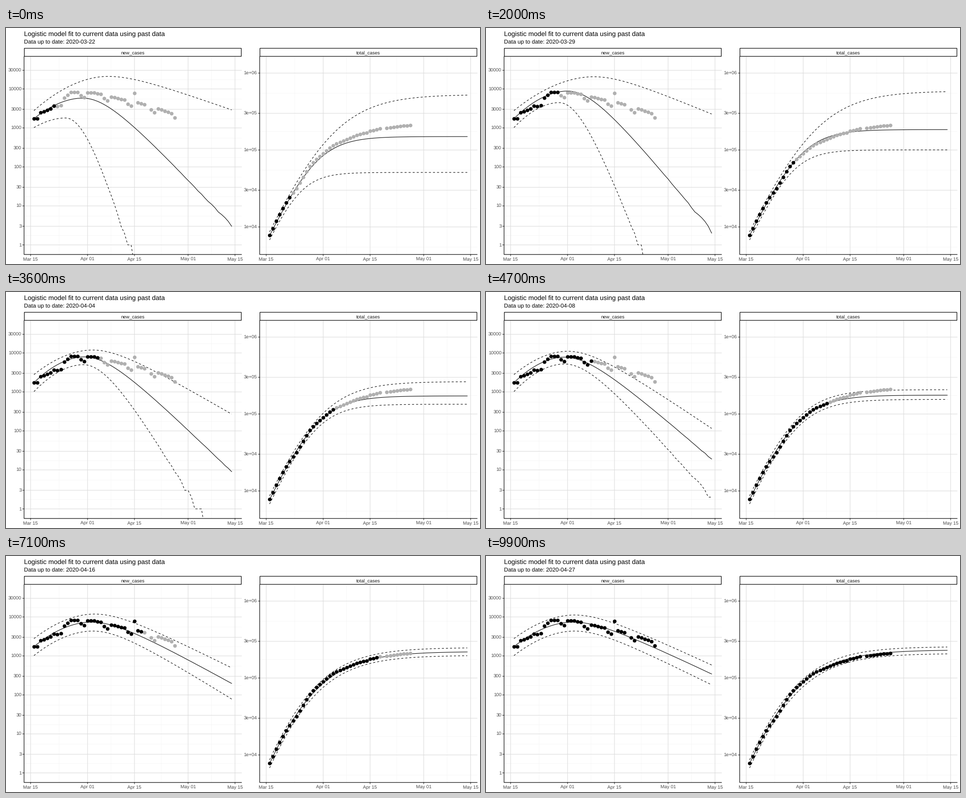
Write a matplotlib script that moves like this. It is 1000 px wide and 500 px high and loops after 10 s.

```python
import numpy as np
import matplotlib.pyplot as plt
from matplotlib.animation import FuncAnimation
from matplotlib.patches import Rectangle

PX = 0.72                      # points per pixel at 100 dpi
FRAMES, DATES = 100, 37
LEFT_X, RIGHT_X = 38.1, 535.2  # panel left edges
WIDTH, TOP, BOTTOM = 458.8, 60.6, 479.8
SPAN = 59                      # days covered by the fitted curves
DAY = WIDTH / (1.1 * SPAN)     # pixels per day, with 5% padding per side
PAD = 0.05 * SPAN
NEW_DECADE, TOTAL_DECADE = 82.6, 163

plt.rcParams["font.family"] = "Liberation Sans"
plt.rcParams["text.hinting"] = "none"
plt.rcParams["text.hinting_factor"] = 1
fig = plt.figure(figsize=(10, 5), dpi=100, facecolor="white")
ax = fig.add_axes([0, 0, 1, 1])
ax.set_xlim(0, 1000)
ax.set_ylim(500, 0)
ax.axis("off")


def new_y(v):
    return 459.5 - NEW_DECADE * np.log10(v)


def new_value(y):
    return 10 ** ((459.5 - y) / NEW_DECADE)


def total_y(v):
    return 1073.5 - TOTAL_DECADE * np.log10(v)


def day_x(x0, day):
    return x0 + DAY * (PAD + day)


def line(xs, ys, color="black", width=1.07, **kw):
    return ax.plot(xs, ys, color=color, lw=width * PX, snap=False, **kw)[0]


def label(x, y, text, size, color="black", ha="left"):
    return ax.text(x, y, text, fontsize=size * PX, color=color, ha=ha,
                   va="baseline", zorder=7)


def midpoints(vals):
    return [(a + b) / 2 for a, b in zip(vals, vals[1:])]


def draw_panel(x0, name, ticks):
    x1 = x0 + WIDTH
    dates = {"Mar 15": -1, "Apr 01": 16, "Apr 15": 30,
             "May 01": 46, "May 15": 60}
    xs = [day_x(x0, d) for d in dates.values()]
    ys = list(ticks.values())
    for x in midpoints(xs):
        line([x, x], [TOP, BOTTOM], "#f2f2f2", 0.6, zorder=1)
    for y in midpoints(ys + [2 * ys[-1] - ys[-3] + ys[-2] - ys[-1]]):
        line([x0, x1], [y, y], "#f2f2f2", 0.6, zorder=1)
    for text, x in zip(dates, xs):
        line([x, x], [TOP, BOTTOM], "#dbdbdb", zorder=1)
        line([x, x], [BOTTOM, BOTTOM + 3], "#333333", zorder=6)
        label(x, 493, text, 9.6, "#4d4d4d", "center")
    for text, y in ticks.items():
        line([x0, x1], [y, y], "#dbdbdb", zorder=1)
        line([x0 - 3, x0], [y, y], "#333333", zorder=6)
        label(x0 - 5.4, y + 3.5, text, 9.6, "#4d4d4d", "right")
    line([x0, x0, x1], [TOP, BOTTOM, BOTTOM], width=1.16, zorder=6,
         solid_capstyle="projecting")
    ax.add_patch(Rectangle((x0 + 0.5, 43), WIDTH - 1, TOP - 43.5, fc="white",
                           ec="black", lw=1.2 * PX, snap=False, zorder=6))
    label(x0 + WIDTH / 2, 55.8, name, 9.6, "#1a1a1a", "center")


draw_panel(LEFT_X, "new_cases",
           {str(v): new_y(v) for v in
            (30000, 10000, 3000, 1000, 300, 100, 30, 10, 3, 1)})
draw_panel(RIGHT_X, "total_cases",
           {t: total_y(float(t)) for t in
            ("1e+06", "3e+05", "1e+05", "3e+04", "1e+04")})

label(38.1, 17, "Logistic model fit to current data using past data", 14.4)
subtitle = label(38.1, 34, "", 12)

# Reported cases: a trend with a weekly dip, one late batch, one missing day
obs_day = np.delete(np.arange(43), 34)
obs_y = np.interp(obs_day, [0, 5, 11, 18, 25, 33, 42],
                  [185, 171, 136, 137, 149, 161.5, 183])
obs_y += 7 * (obs_day % 7 == 0) + 10 * (obs_day % 7 == 1)
obs_y[obs_day == 30] -= 19
obs_new = new_value(obs_y)
obs_total_y = total_y(7760 - obs_new[0] + np.cumsum(obs_new))

# How each band's shape drifts as data arrive, in heights and days
KEY_DATES = [0, 4, 10, 17, 26, 36]
BANDS = [
    dict(style="-", start=192, total_start=440, bend=1.2,
         peak_day=[14.5, 17, 15, 15, 17, 17.5],
         peak=[148.5, 130, 137, 138, 140, 140],
         end=[420, 460, 402, 354, 270, 250],
         total_end=[230, 209, 221.5, 218.5, 202.5, 199]),
    dict(style=(0, (4, 4)), start=175, total_start=432, bend=2,
         peak_day=[22, 29, 18.5, 16, 18, 18],
         peak=[102.5, 85.5, 121, 125.5, 123, 125],
         end=[173.5, 128.5, 236, 289, 237, 231],
         total_end=[141, 90, 177, 207, 194, 192]),
    dict(style=(0, (4, 4)), start=211, total_start=449, bend=1,
         peak_day=[9.5, 12.5, 14.5, 15, 17.5, 18],
         peak=[190.5, 161, 155, 152.5, 159, 159],
         end=[1207, 1058, 686, 437, 303, 273],
         total_end=[306, 271, 245.5, 227.5, 210.5, 206.5]),
]
days = np.arange(SPAN + 1)


def at(k, values):
    return np.interp(k, KEY_DATES, values)


def new_curve(band, k):
    """Power-law climb to the peak, then a hyperbola down to the end."""
    mid, peak, end = (at(k, band[p]) for p in ("peak_day", "peak", "end"))

    def fall(u):
        return np.hypot(u, 11) - 11

    before = np.clip((mid - days) / mid, 0, None) ** 1.9
    after = fall(np.clip(days - mid, 0, None)) / fall(SPAN - mid)
    y = peak + (band["start"] - peak) * before + (end - peak) * after
    # Whole cases only; zero drops below the panel
    return new_y(np.maximum(np.round(new_value(y)), 0.3))


def total_curve(band, k):
    """Generalised logistic growth on a log scale."""
    end = at(k, band["total_end"])
    bend = np.interp(k, [10, 17, 26], [band["bend"], 1.5, 3])
    growth = np.interp(k, [10, 26], [14, 15.3])    # first slope per day
    scale = bend * TOTAL_DECADE
    a = 10 ** ((band["total_start"] - end) / scale) - 1
    rate = growth * np.log(10) / scale * (1 + a) / a
    return end + scale * np.log10(1 + a * np.exp(-rate * days))


def make_panel(x0):
    clip = Rectangle((x0, TOP), WIDTH, BOTTOM - TOP, transform=ax.transData)
    curves = []
    for band in BANDS:
        curve = line(day_x(x0, days), 0 * days, ls=band["style"], zorder=3,
                     dash_capstyle="butt")
        curve.set_clip_path(clip)
        curves.append(curve)
    dots = [ax.plot([], [], "o", color=c, ms=7.8 * PX, mew=0, snap=False,
                    zorder=4)[0] for c in ("#b0b0b0", "black")]
    return curves, dots, day_x(x0, obs_day)


panels = [(*make_panel(LEFT_X), obs_y, new_curve),
          (*make_panel(RIGHT_X), obs_total_y, total_curve)]

# Data switch at the nearest step, the date text once its day is reached
starts = np.round(1 + (FRAMES - 1) / (DATES - 1) * np.arange(DATES)) - 1


def update(i):
    k = int(np.searchsorted(starts, i, "right")) - 1
    shown = i * (DATES - 1) // (FRAMES - 1)
    month, day = (3, 22 + shown) if shown < 10 else (4, shown - 9)
    subtitle.set_text(f"Data up to date: 2020-{month:02d}-{day:02d}")
    known = obs_day <= 6 + k
    for curves, dots, xs, ys, shape in panels:
        for curve, band in zip(curves, BANDS):
            curve.set_ydata(shape(band, k))
        for dot, mask in zip(dots, (~known, known)):
            dot.set_data(xs[mask], ys[mask])
    return []


anim = FuncAnimation(fig, update, frames=FRAMES, interval=100, repeat=True,
                     repeat_delay=0, init_func=lambda: update(0), blit=False)
plt.show()
```
